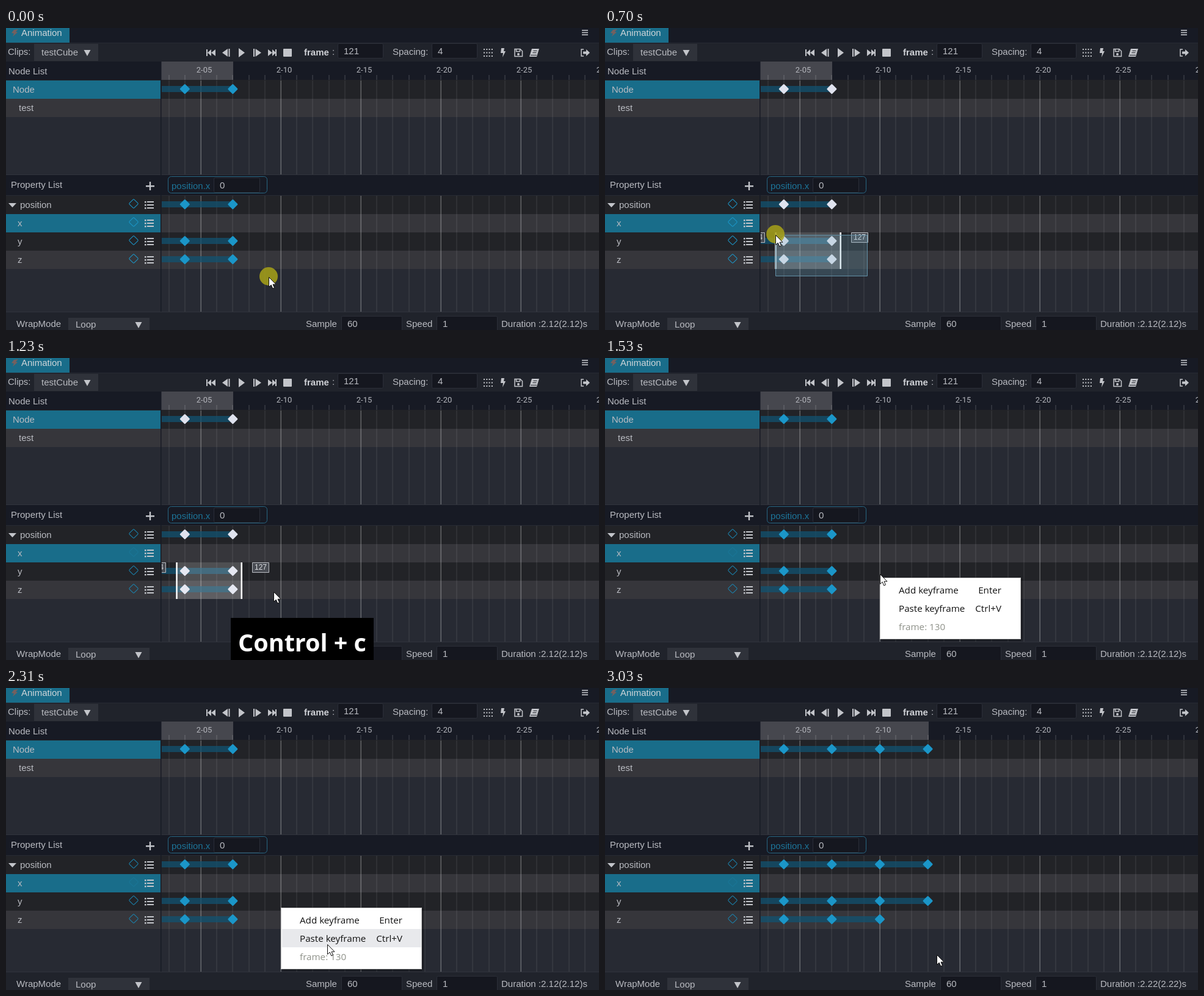
Recreate the animation shown at these times as an HTML page with a canvas. Size 971 by 495 pixels, loop 3.1 s.

```html
<!DOCTYPE html>
<html lang="en">
<head>
<meta charset="utf-8">
<title>Animation panel</title>
<style>
html, body { margin: 0; width: 100%; height: 100%; overflow: hidden; background: #272a33; }
canvas { display: block; }
</style>
</head>
<body>
<canvas id="stage" width="971" height="495"></canvas>
<script>
const ctx = document.getElementById('stage').getContext('2d');
const LOOP = 3100;
const UI = '15px "Liberation Sans", Arial, sans-serif';
const MENU = '15.2px "Open Sans", sans-serif';
const TEXT = '#b9bbc1', ICON = '#c3c5ca', BLUE = '#1b96c8', WHITE = '#dfe2ee';
const ROWS = { node: 100, position: 289, y: 349, z: 379 };
const DRAG_START = [430, 407];

// Pointer position from each time on: [ms, x, y]
const POINTER = [
  [0, 430, 408], [80, 405, 398], [150, 371, 386], [220, 336, 374], [290, 308, 365],
  [370, 296, 357], [450, 288, 347], [530, 284, 343], [620, 281, 341], [700, 279, 339],
  [850, 330, 360], [930, 412, 384], [1080, 438, 383], [1320, 450, 354],
  [2010, 495, 400], [2080, 526, 427], [2310, 526, 420],
  [2790, 522, 421], [2870, 516, 423], [2950, 510, 425], [3030, 543, 437]
];

const frameX = f => 319 + (f - 5) * 26.2;

function box(x, y, w, h, fill, stroke, radius = 0) {
  ctx.beginPath();
  ctx.roundRect(x, y, w, h, radius);
  if (fill) { ctx.fillStyle = fill; ctx.fill(); }
  if (stroke) { ctx.strokeStyle = stroke; ctx.lineWidth = 1; ctx.stroke(); }
}

function text(str, x, y, color = TEXT, font = UI, align = 'left') {
  ctx.font = font;
  ctx.textAlign = align;
  ctx.fillStyle = color;
  ctx.fillText(str, x, y);
}

function poly(color, ...points) {
  ctx.beginPath();
  for (let i = 0; i < points.length; i += 2) ctx.lineTo(points[i], points[i + 1]);
  ctx.closePath();
  ctx.fillStyle = color;
  ctx.fill();
}

function diamond(x, y, size, fill, stroke) {
  ctx.save();
  ctx.translate(x, y);
  ctx.rotate(Math.PI / 4);
  box(-size / 2, -size / 2, size, size, fill, stroke, 1.5);
  ctx.restore();
}

function clipped(x, y, w, h, draw) {
  ctx.save();
  ctx.beginPath();
  ctx.rect(x, y, w, h);
  ctx.clip();
  draw();
  ctx.restore();
}

function field(x, y, w, h, value) {
  box(x + .5, y + .5, w, h, '#15171f', '#2b2e38', 2);
  text(value, x + 10, y + 18);
}

function dropdown(x, y, w, h, label, baseline) {
  box(x, y, w, h, '#2f323a');
  text(label, x + 12, baseline);
  const cx = x + w - 18;
  poly(ICON, cx - 5.5, baseline - 9, cx + 5.5, baseline - 9, cx, baseline + 1);
}

function toolbarIcons() {
  box(328, 35, 2, 11, ICON);
  poly(ICON, 336, 35, 336, 46, 330, 40.5);
  poly(ICON, 343, 35, 343, 46, 336, 40.5);
  poly(ICON, 363, 34, 363, 47, 354, 40.5);
  box(364.5, 34, 2, 13, ICON);
  poly(ICON, 381, 33, 391, 40.5, 381, 48);
  box(405, 34, 2, 13, ICON);
  poly(ICON, 408.5, 34, 418, 40.5, 408.5, 47);
  poly(ICON, 429, 35, 436, 40.5, 429, 46);
  poly(ICON, 436, 35, 442, 40.5, 436, 46);
  box(441, 35, 2, 11, ICON);
  box(454, 34, 14, 13, ICON, null, 1);
  for (let i = 0; i < 12; i++) box(782 + i % 4 * 4.3, 34 + Math.floor(i / 4) * 5.5, 2, 2, ICON);
  poly(ICON, 811, 33, 816, 33, 815, 38, 818, 38, 813, 48, 814, 41, 810, 41);
  ctx.lineWidth = 1.5;
  ctx.strokeStyle = ICON;
  ctx.stroke(new Path2D('M833 34.5h9l3.5 3.5v8.500h-12.500zM835.500 34.500v4h6v-4M942 35h-.1M946 35h-4v11h4'));
  box(837, 41, 4, 4, ICON, null, 2);
  poly(ICON, 861, 34, 873, 34, 869, 47, 857, 47);
  ctx.strokeStyle = '#20232b';
  ctx.lineWidth = 1;
  ctx.stroke(new Path2D('M863.500 37.500h6M862.500 40.500h6M859 44.500h10'));
  box(945, 38.5, 5, 4, ICON);
  poly(ICON, 950, 35, 956, 40.5, 950, 46);
  for (let i = 0; i < 3; i++) box(943, 3 + i * 3.7, 10, 1.6, ICON);
}

function listIcon(y) {
  for (let i = -1; i < 2; i++) {
    box(227, y + i * 5 - 1, 2.5, 2.5, ICON);
    box(231, y + i * 5 - 1, 11, 2, ICON);
  }
}

function panels(t, pasted) {
  box(0, 0, 971, 495, '#272a33');
  box(0, 0, 971, 24, '#171a24');
  box(0, 0, 104, 24, '#196d8a');
  poly('#75605f', 13, 3, 20, 2, 16, 6, 19, 7, 11, 14, 13, 9, 9, 8);
  text('Animation', 25, 13, '#ced5d9');

  box(0, 25, 971, 30, '#20232b');
  text('Clips:', 3, 44);
  dropdown(46, 26, 105, 28, 'testCube', 45);
  text('frame', 488, 45, '#d0d2d7', 'bold ' + UI);
  text(':', 534, 44);
  field(543, 25, 74, 24, '121');
  text('Spacing:', 633, 44);
  field(697, 25, 74, 24, '4');
  toolbarIcons();

  box(0, 55, 971, 30, '#171a24');
  box(254, 55, (pasted ? 530 : 372) - 254, 30, '#46474e');
  text('Node List', 4, 76);
  box(0, 85, 971, 31, '#222327');
  box(0, 116, 971, 30, '#36363b');
  box(0, 86, 253, 30, '#196d8a');
  text('Node', 11, 106);
  text('test', 21, 136);

  box(0, 240, 971, 34, '#171a24');
  box(0, 240, 971, 1, '#30333c');
  text('Property List', 8, 262);
  box(229, 258, 14, 2.4, ICON);
  box(234.8, 252, 2.4, 14, ICON);
  box(265.5, 243.5, 162, 27, null, '#286783', 5);
  text('position.x', 271, 264, '#1d7599');
  field(340, 245, 75, 24, '0');
  ['position', 'x', 'y', 'z'].forEach((name, i) => {
    const y = 275 + i * 30;
    box(0, y, 971, 30, i % 2 ? '#36363b' : '#222327');
    if (name === 'x') box(0, y, 253, 30, '#196d8a');
    text(name, i ? 19 : 23, y + 20);
    const outline = t < 850 ? '#1c97c9' : name === 'x' ? '#1b7697' : '#1b83ae';
    diamond(209, y + 13, 11, null, outline);
    listIcon(y + 15);
  });
  poly(ICON, 4, 287, 17, 287, 10.5, 294);

  box(0, 465, 971, 30, '#20232b');
  box(0, 465, 971, 1, '#30333c');
  text('WrapMode', 17, 490);
  dropdown(102, 475, 133, 20, 'Loop', 491);
  text('Sample', 491, 490);
  field(549, 472, 99, 26, '60');
  text('Speed', 655, 490);
  field(705, 472, 99, 26, '1');
  const length = pasted ? '2.22' : '2.12';
  text(`Duration :${length}(${length})s`, 811, 490);
}

function grid() {
  for (let f = 3; f <= 30; f++) {
    const x = Math.round(frameX(f)) - .5, major = f % 5 === 0;
    const color = major ? 'rgba(255,255,255,.32)' : 'rgba(255,255,255,.13)';
    box(x, 77, 1, 8, 'rgba(255,255,255,.22)');
    box(x, 86, major ? 1.4 : 1, 154, color);
    box(x, 275, major ? 1.4 : 1, 190, color);
    if (major) text('2-' + String(f).padStart(2, '0'), x + 6, 73, '#b5b7bd', '13px Roboto, sans-serif', 'center');
  }
  box(253, 55, 1.5, 410, '#171a24');
}

function selectedKeys(t, px, py) {
  const picked = { node: new Set(), position: new Set(), y: new Set(), z: new Set() };
  if (t >= 1530) return picked;
  const dragging = t < 850;
  for (const row of ['y', 'z']) for (const f of [4, 7]) {
    if (dragging && (px > frameX(f) || py > ROWS[row] || t < 80)) continue;
    for (const name of [row, 'node', 'position']) picked[name].add(f);
  }
  return picked;
}

function tracks(picked, pasted) {
  for (const [row, y] of Object.entries(ROWS)) {
    const keys = !pasted ? [4, 7] : row === 'z' ? [4, 7, 10] : [4, 7, 10, 13];
    box(255, y - 5, frameX(keys.at(-1)) - 255, 10, 'rgba(18,82,112,.76)');
    for (const f of keys) diamond(frameX(f), y, 12.2, picked[row].has(f) ? WHITE : BLUE);
  }
}

function rangeTag(x, label) {
  box(x + .5, 335.5, 27, 16, '#494c53', '#b9bcc2');
  text(label, x + 4, 347, '#dddfe3', '12px "Liberation Sans", Arial, sans-serif');
}

function rangeBox() {
  clipped(255, 330, 716, 70, () => {
    box(280, 335, 106, 60, 'rgba(255,255,255,.2)');
    box(278.3, 335, 2.5, 60, '#fff');
    box(384.5, 335, 2.5, 60, '#fff');
    rangeTag(234, '124');
    rangeTag(403, '127');
  });
}

function menu(hover) {
  ctx.save();
  ctx.shadowColor = 'rgba(0,0,0,.5)';
  ctx.shadowBlur = 4;
  ctx.shadowOffsetX = ctx.shadowOffsetY = 2;
  box(450, 360, 231, 101, '#fff');
  ctx.restore();
  box(450.5, 360.5, 230, 100, null, '#c8c8c8');
  if (hover) box(452, 395, 228, 30, '#e8e9ec');
  text('Add keyframe', 481, 386, '#111', MENU);
  text('Enter', 649, 386, '#111', MENU, 'right');
  text('Paste keyframe', 481, 416, '#111', MENU);
  text('Ctrl+V', 649, 416, '#111', MENU, 'right');
  text('frame: 130', 481, 446, '#8e9189', MENU);
}

function pointer(x, y) {
  ctx.save();
  ctx.translate(x + .5, y + .5);
  const arrow = new Path2D('M0 0V16L3.700 12.600L6.300 18.500L9 17.300L6.500 11.700H11.500Z');
  ctx.fillStyle = '#fff';
  ctx.fill(arrow);
  ctx.strokeStyle = '#111';
  ctx.lineWidth = 1;
  ctx.stroke(arrow);
  ctx.restore();
}

function draw(now) {
  const t = now % LOOP;
  const [, px, py] = POINTER.findLast(p => p[0] <= t);
  const pasted = t >= 2480, dragging = t < 850;
  const picked = selectedKeys(t, px, py);

  panels(t, pasted);
  grid();
  tracks(picked, pasted);
  if (picked.z.size > 1) rangeBox();
  if (dragging) {
    if (t >= 80) box(px + .5, py + .5, DRAG_START[0] - px - 1, DRAG_START[1] - py - 1, 'rgba(105,160,185,.25)', '#6391a8');
    box(px - 15, py - 16, 30, 30, 'rgba(166,161,24,.86)', null, 15);
  }
  if (t >= 1080 && t < 1320) {
    box(368, 426, 234, 69, '#000');
    text('Control + c', 485, 481, '#fff', 'bold 39.5px "Open Sans", sans-serif', 'center');
  }
  if (t >= 1530 && t < 2480) menu(t >= 2310 || (t >= 2010 && t < 2080));
  pointer(px, py);
  requestAnimationFrame(draw);
}
requestAnimationFrame(draw);
</script>
</body>
</html>
```
